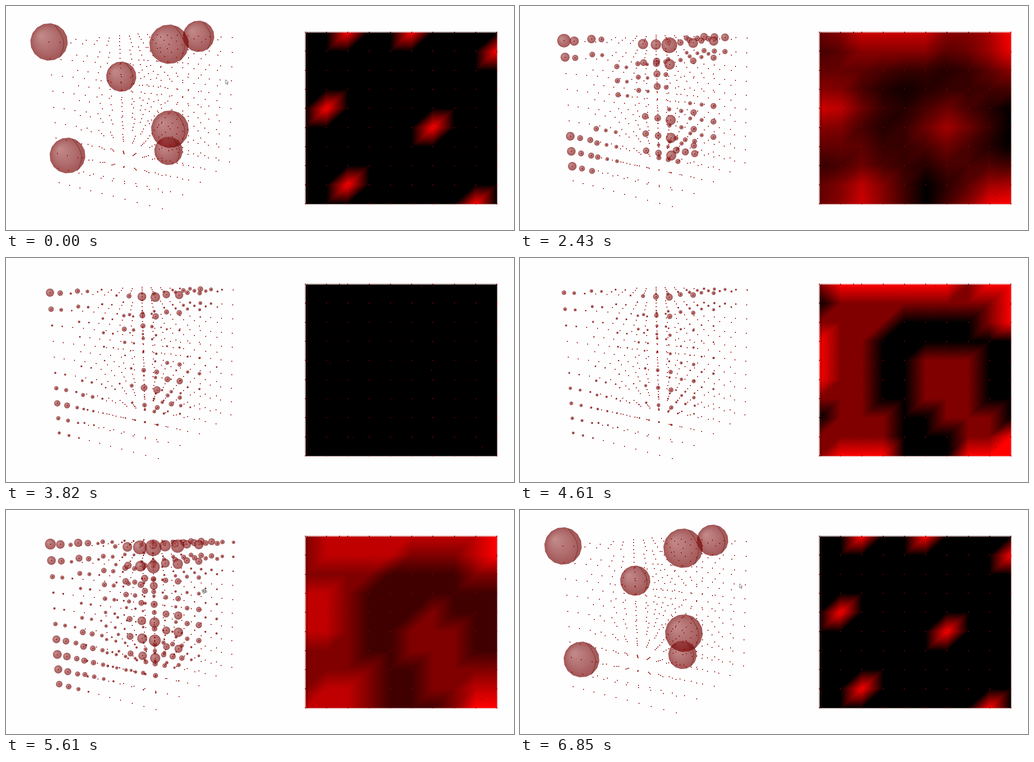
These frames come from a looping animation (1127 px wide and 497 px high, 6.95 s). A matplotlib script:

```python
import numpy as np
import matplotlib.pyplot as plt
from matplotlib.animation import FuncAnimation
from matplotlib.collections import LineCollection, PolyCollection
from matplotlib.colors import LinearSegmentedColormap
from matplotlib.patches import Ellipse, Polygon, Rectangle
from matplotlib.tri import Triangulation

W, H, DPI = 1127, 497, 64
LOOP, STEP = 6950, 50
PT = 72 / DPI  # points per pixel


def mix(a, b, k):
    return a + (b - a) * k


def ramp(t, start, end, steps):
    """Rise from 0 to 1 in equal hard steps, the last one at `end`."""
    done = np.floor((t - start) / (end - start) * steps) + 1
    return float(np.clip(done / (steps + 1), 0, 1))


def blur(a):
    """Mean over neighbouring cells, clipped at the borders of the lattice."""
    for axis, n in enumerate(a.shape):
        i = np.arange(n)
        k = (abs(i[:, None] - i) <= 1).astype(float)
        k /= k.sum(1, keepdims=True)
        a = np.moveaxis(np.tensordot(k, a, (1, axis)), 0, axis)
    return a


# ---------- lattice and camera ----------
SHAPE = (10, 10, 5)
SPAN = np.array(SHAPE) - 1
GRID = np.indices(SHAPE).reshape(3, -1).T / SPAN
CORNERS = np.array([(0, 0, 0), (0, 1, 0), (1, 0, 0), (1, 1, 0),
                    (1, 0, 1), (1, 1, 1), (0, 0, 1), (0, 1, 1)], float)

# corner pixels in the opening pose and after the first turn
OPENING = np.array([(95, 80), (118.5, 392), (342, 93.5), (348, 450),
                    (502, 70), (496, 346), (294, 62), (299, 310.5)])
TURNED = np.array([(97.5, 77), (118, 388), (331, 87), (338, 445),
                   (504, 71), (499, 348), (302, 65), (307.6, 313)])
FOCAL, AIM = 1035, np.array([425, 252])


def fit_camera(pixels):
    """Perspective matrix that sends the lattice corners to the pixels."""
    rows, rhs = [], []
    for p, (x, y) in zip(CORNERS, (pixels - AIM) / FOCAL):
        h = [*p, 1]
        rows += [h + [0] * 4 + list(-x * p), [0] * 4 + h + list(-y * p)]
        rhs += [x, y]
    sol = np.linalg.lstsq(np.array(rows), np.array(rhs), rcond=None)[0]
    return np.append(sol, 1).reshape(3, 4)


def project(pts, yaw, tilt):
    """Pixels and depths of lattice points, tilted about the middle of the box."""
    cam = fit_camera(mix(OPENING, TURNED, yaw))
    q = np.c_[pts, np.ones(len(pts))] @ cam.T
    mid = cam @ [.5, .5, .5, 1]
    c, s = np.cos(tilt), np.sin(tilt)
    q = (q - mid) @ np.array([(1, 0, 0), (0, c, s), (0, -s, c)]).T + mid
    return q[:, :2] / q[:, 2:] * FOCAL + AIM, q[:, 2]


def pose(t):
    back = ramp(t, 5760, 6850, 8)
    yaw = ramp(t, 430, 550, 1) + .45 * ramp(t, 5480, 5610, 1) - 1.45 * back
    return yaw, .2 * np.sin(2 * np.pi * back) * (1 - .4 * back)


# ---------- density around the seeds ----------
SEEDS = np.array([(6, 0, 4), (0, 3, 3), (3, 9, 4), (0, 0, 0),
                  (1, 7, 0), (8, 5, 1), (8, 0, 1)])
density = np.zeros(SHAPE)
density[tuple(SEEDS.T)] = 1
SOLID = [density]
for _ in range(3):
    SOLID.append(blur(SOLID[-1]))
SOLID = [(s / s[0, 0, 0]).ravel() for s in SOLID]


def ball_sizes(t):
    if t < 950 or t >= 6850:
        return SOLID[0] * 41.5
    if t < 2850:
        return SOLID[1] * (5 + 10 * ramp(t, 1850, 2130, 2))
    if t < 4090:
        return SOLID[2] * 9 * ramp(t, 2850, 3120, 2)
    return SOLID[3] * (3.5 + 1.5 * ramp(t, 4490, 4610, 1) + 7 * ramp(t, 4920, 5330, 2))


# ---------- colour fields of the right panel ----------
X0, X1, Y0, Y1 = 664, 1089, 58, 439
MARKS = np.array([(1.61, 0), (5.46, .1), (9, 1.07), (1.17, 4.16),
                  (5.92, 4.52), (2.27, 8.04), (8.3, 8.52)])
J, I = np.indices((10, 10))
POINTS = np.zeros((10, 10))
nodes = np.rint(MARKS).astype(int)
POINTS[nodes[:, 1], nodes[:, 0]] = 1
ONCE = blur(POINTS)
TWICE = blur(ONCE)
THRICE = blur(TWICE)
border = (I % 9 == 0) | (J % 9 == 0)
LEVELS = .5 * (TWICE > 3.9 / 81) + .5 * (border & (ONCE > 1e-9))
DENSE = np.maximum(.25, np.ceil(4 * blur(LEVELS) - 1e-6) / 4)
ONCE, TWICE, THRICE = (f / f.max() for f in (ONCE, TWICE, THRICE))


def panel_field(t):
    if t < 1260 or t >= 6850:
        return POINTS
    if t < 2590:
        return mix(ONCE, TWICE, ramp(t, 1850, 2430, 4))
    if t < 3820:
        return mix(TWICE, THRICE, ramp(t, 2590, 3670, 8))
    return mix(LEVELS * ramp(t, 3940, 4610, 3), DENSE, ramp(t, 4920, 5610, 4))


# ---------- stage ----------
fig = plt.figure(figsize=(W / DPI, H / DPI), dpi=DPI, facecolor="#fefefe")
ax = fig.add_axes([0, 0, 1, 1])
ax.axis("off")


def panel_xy(i, j):
    return X0 + i * (X1 - X0) / 9, Y0 + j * (Y1 - Y0) / 9


def squares(x, y, size, color, z):
    return ax.scatter(x, y, s=(size * PT) ** 2, color=color, marker="s",
                      linewidths=0, zorder=z)


node_x, node_y = panel_xy(I.ravel(), J.ravel())
tris = [tri for a in range(90) if a % 10 < 9
        for tri in ((a, a + 1, a + 10), (a + 1, a + 11, a + 10))]
panel = ax.tripcolor(Triangulation(node_x, node_y, tris), POINTS.ravel(), shading="gouraud",
                     vmin=0, vmax=1,
                     cmap=LinearSegmentedColormap.from_list("ember", ["black", "red"]))
ax.add_patch(Rectangle((X0 - .5, Y0 - .5), X1 - X0 + 1, Y1 - Y0 + 1,
                       fill=False, ec="#ecc8c8", lw=PT, zorder=3))
ax.plot([X0 + 3.5] * 2, [Y0, Y1], color="#500000", lw=.8 * PT, zorder=3)
squares(node_x, node_y, 2.2, "#960000", 4)
seed_marks = squares(*panel_xy(*MARKS.T), 2, "#780000", 4)
squares(*panel_xy(*MARKS[2]), 2.4, "#960000", 4)

balls = ax.add_collection(PolyCollection([], linewidths=.6 * PT, zorder=5), autolim=False)
seams = ax.add_collection(LineCollection([], colors=[(.25, .05, .05, .7)],
                                         linewidths=.8 * PT, zorder=6), autolim=False)
dots = squares([0], [0], 2.4, "#980000", 7)

arrow = ax.add_patch(Polygon(
    np.array([(0, 0), (0, 9), (2, 7.2), (3.8, 11), (5.3, 10.3), (3.8, 6.8), (6.4, 6.5)])
    + (487, 163.5), fc="white", ec="#555555", lw=.8 * PT, zorder=9))
orbit = [ax.add_patch(Ellipse((440, 180), w, h, angle=20, fc="white", ec="#444444",
                              lw=.9 * PT, zorder=9))
         for w, h in [(11, 5), (5, 11), (4, 4)]]

ax.set_xlim(0, W)
ax.set_ylim(H, 0)

ANGLE = np.arange(16) * np.pi / 8 + .1
RING = np.c_[np.cos(ANGLE), np.sin(ANGLE)]
S = np.linspace(0, 1, 20)
SEAM = np.c_[.28 + .25 * S + .37 * np.sin(np.pi * S), -.92 + 1.8 * S]


def sphere(centre, r):
    """Translucent body plus shrinking layers that build up the highlight."""
    layers = 14 if r > 20 else 5
    polys, faces = [centre + r * RING], [(.47, 0, 0, .65)]
    for s in np.linspace(.9, .1, layers):
        shift = r * np.array([-.42, -.34]) * (1 - s) / .9
        polys.append(centre + shift + r * s * RING)
        faces.append((1, .92, .92, .45 / layers))
    return polys, faces, [(.3, .03, .03, .25)] + [(0, 0, 0, 0)] * layers


def draw(n):
    t = (n + 1) * STEP - 1
    xy, depth = project(GRID, *pose(t))
    dots.set_offsets(xy)

    radii = ball_sizes(t) / depth
    shown = [k for k in np.argsort(-depth) if radii[k] > 1.4]
    polys, faces, edges = [], [], []
    for k in shown:
        for total, part in zip((polys, faces, edges), sphere(xy[k], radii[k])):
            total += part
    balls.set_verts(polys)
    balls.set_facecolor(faces)
    balls.set_edgecolor(edges)
    seams.set_segments([xy[k] + radii[k] * SEAM for k in shown if radii[k] > 25])

    panel.set_array(panel_field(t).ravel())
    seed_marks.set_visible(1260 <= t < 6850)
    arrow.set_visible(t < 280 or t >= 6850)
    for ring in orbit:
        ring.set_visible(5480 <= t < 6850)
    return [panel, balls, seams, dots]


anim = FuncAnimation(fig, draw, frames=LOOP // STEP, interval=STEP,
                     repeat=True, repeat_delay=0, blit=False)
plt.show()
```
